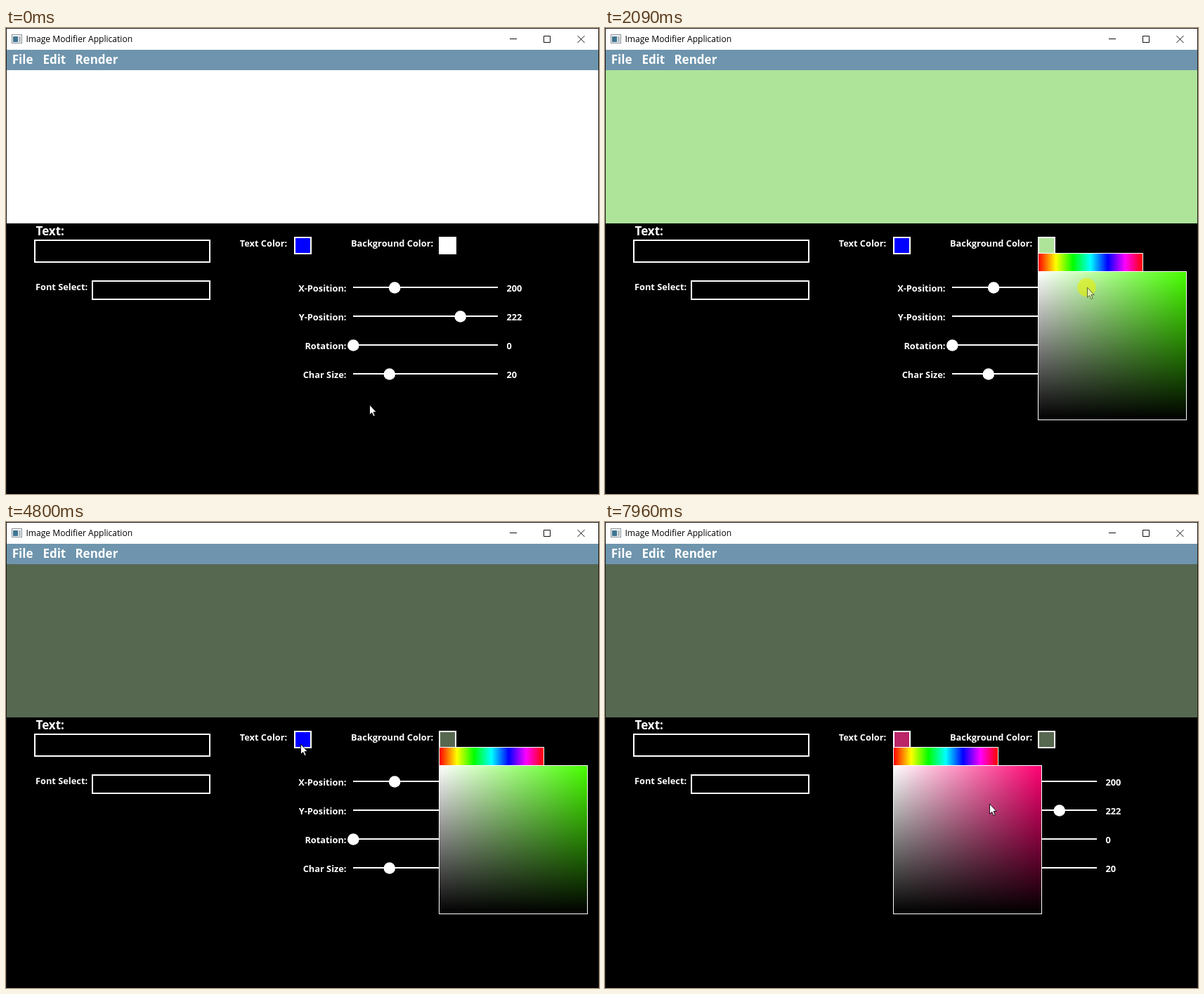
Animation, 844 px wide and 663 px high, one loop 8 s. Source, as an HTML page with a canvas:

```html
<!DOCTYPE html>
<html lang="en">
<head>
<meta charset="utf-8">
<title>Image Modifier Application</title>
<style>
  html, body { margin: 0; width: 100%; height: 100%; overflow: hidden; background: #000; }
  canvas { display: block; }
</style>
</head>
<body>
<canvas id="stage" width="844" height="663"></canvas>
<script>
const ctx = document.getElementById('stage').getContext('2d');
const LOOP = 8000;
const HOLD = 170;   // how long the button stays down
const DWELL = 270;  // pause at a stop before the pointer moves on
const BAR = 148, SIDE = 210, BAR_TOP = 321, TOP = 347;
const SWATCH_X = { text: 410, back: 616 };
const SANS = '"Open Sans", "Noto Sans", sans-serif';
const SMALL = 'bold 12.8px ' + SANS;
const LARGE = 'bold 17px ' + SANS;

const clamp = u => Math.min(1, Math.max(0, u));

// Actions on the interface, run by clicks
const open = target => s => { s.target = target; s.hue = 0; };
const setHue = (s, x) => { s.hue = (x - SWATCH_X[s.target] - 1) / BAR * 360; };
const setShade = (s, x, y) => {
  const sat = (x - SWATCH_X[s.target] - 1) / SIDE;
  s[s.target] = hsv(s.hue, sat, 1 - (y - TOP) / SIDE);
};

// Pointer stops: time, x, y and, for a click, its action
const stops = [
  [-200, 517, 536],
  [760, 632, 311, open('back')],
  [1500, 659.5, 337, setHue],
  [2040, 686, 369, setShade],
  [2640, 686, 432, setShade],
  [3220, 666, 471, setShade],
  [4300, 414, 318],
  [4700, 419, 316],
  [5030, 422, 315, open('text')],
  [5830, 548, 335, setHue],
  [6380, 576, 373, setShade],
  [7080, 580, 442, setShade],
  [7520, 578, 404, setShade],
  [7960, 547, 401]
];

function hsv(h, s, v) {
  const channel = n => {
    const k = (n + h / 60) % 6;
    return Math.round(255 * v * (1 - s * clamp(Math.min(k, 4 - k))));
  };
  return `rgb(${channel(5)}, ${channel(3)}, ${channel(1)})`;
}

function stateAt(t) {
  const s = { back: '#fff', text: '#00f', target: null, hue: 0, down: false };
  for (const [at, x, y, act] of stops) {
    if (!act || at > t) continue;
    act(s, x, y);
    s.down = t < at + HOLD;
  }
  return s;
}

// Longer trips take longer, but always end by the next stop
function pointerAt(t) {
  const i = stops.findIndex(stop => stop[0] > t);
  if (i < 0) return stops[stops.length - 1].slice(1, 3);
  const [t0, x0, y0] = stops[i - 1], [t1, x1, y1] = stops[i];
  const leave = t0 + DWELL;
  const trip = Math.min(t1 - leave, 100 + 2.2 * Math.hypot(x1 - x0, y1 - y0));
  const u = clamp((t - leave) / trip);
  const e = u * u * (3 - 2 * u);
  return [x0 + (x1 - x0) * e, y0 + (y1 - y0) * e];
}

function rect(x, y, w, h, color) {
  ctx.fillStyle = color;
  ctx.fillRect(x, y, w, h);
}

function frame(x, y, w, h, fill = '#000', line = 2) {
  rect(x, y, w, h, '#fff');
  rect(x + line, y + line, w - 2 * line, h - 2 * line, fill);
}

function disc(x, y, r, color) {
  ctx.fillStyle = color;
  ctx.beginPath();
  ctx.arc(x, y, r, 0, Math.PI * 2);
  ctx.fill();
}

function label(str, x, y, font = SMALL, align = 'left', color = '#fff') {
  ctx.font = font;
  ctx.textAlign = align;
  ctx.fillStyle = color;
  ctx.fillText(str, x, y);
}

function drawWindow() {
  rect(0, 0, 844, 663, '#1c1c1c');
  rect(1, 1, 842, 30, '#fff');
  rect(1, 31, 842, 29, '#6e95ad');
  rect(1, 60, 842, 603, '#000');

  rect(8, 9, 15, 13, '#8a9298');
  rect(9, 10, 13, 11, '#f4f6f7');
  rect(10, 12, 7, 8, '#3f7591');
  rect(18, 12, 3, 8, '#b4bcc2');
  label('Image Modifier Application', 28.4, 20, '12.1px ' + SANS, 'left', '#000');

  ctx.strokeStyle = '#111';
  ctx.lineWidth = 1;
  ctx.stroke(new Path2D('M717 15.5h10M765.5 11.5h9v9h-9zM813.5 11l10 10m0-10l-10 10'));

  label('File', 8.7, 51, LARGE);
  label('Edit', 52.4, 51, LARGE);
  label('Render', 98.4, 51, LARGE);
}

function drawSlider(name, value, max, row) {
  const x = 494, w = 206, y = 369 + 41 * row;
  label(name, 484.5, y + 6, SMALL, 'right');
  rect(x, y - 1, w, 2, '#fff');
  disc(x + 0.3 + w * value / max, y + 0.5, 8.3, '#fff');
  label(value, 712.5, y + 6);
}

function drawControls(s) {
  rect(1, 60, 842, 218, s.back);
  label('Text:', 42.5, 295, LARGE);
  frame(40, 301, 251, 33);
  label('Font Select:', 42, 373);
  frame(122, 359, 169, 28);
  label('Text Color:', 332.7, 311);
  label('Background Color:', 491, 311);
  for (const key in SWATCH_X) frame(SWATCH_X[key], 297, 25, 25, s[key]);
  drawSlider('X-Position:', 200, 700, 0);
  drawSlider('Y-Position:', 222, 300, 1);
  drawSlider('Rotation:', 0, 360, 2);
  drawSlider('Char Size:', 20, 80, 3);
}

function fade(x0, y0, x1, y1, colors) {
  const g = ctx.createLinearGradient(x0, y0, x1, y1);
  colors.forEach((c, i) => g.addColorStop(i / (colors.length - 1), c));
  return g;
}

function drawPicker(x, hue) {
  const left = x + 1, right = left + SIDE;
  const rainbow = Array.from({ length: 7 }, (_, i) => hsv(i * 60, 1, 1));
  frame(x, BAR_TOP - 1, BAR + 2, 27, fade(left, 0, left + BAR, 0, rainbow), 1);
  frame(x, TOP - 1, SIDE + 2, SIDE + 2, hsv(hue, 1, 1), 1);
  rect(left, TOP, SIDE, SIDE, fade(left, 0, right, 0, ['#fff', '#fff0']));
  rect(left, TOP, SIDE, SIDE, fade(0, TOP, 0, TOP + SIDE, ['#0000', '#000']));
}

const arrow = new Path2D('M.5 0V14.4L3.7 11.4 6 16.6 8.2 15.6 6 10.6H10.2Z');

function drawPointer(t, down) {
  const [x, y] = pointerAt(t).map(Math.round);
  if (down) disc(x - 0.5, y, 13.2, 'rgba(232,240,0,.6)');
  ctx.save();
  ctx.translate(x, y);
  ctx.fillStyle = down ? '#e2eeae' : '#fff';
  ctx.fill(arrow);
  ctx.strokeStyle = down ? '#4a5a30' : '#000';
  ctx.lineWidth = 0.9;
  ctx.stroke(arrow);
  ctx.restore();
}

function draw(t) {
  const s = stateAt(t);
  drawWindow();
  drawControls(s);
  if (s.target) drawPicker(SWATCH_X[s.target], s.hue);
  drawPointer(t, s.down);
}

const start = performance.now();
function tick() {
  draw((performance.now() - start) % LOOP);
  requestAnimationFrame(tick);
}
tick();
</script>
</body>
</html>
```
